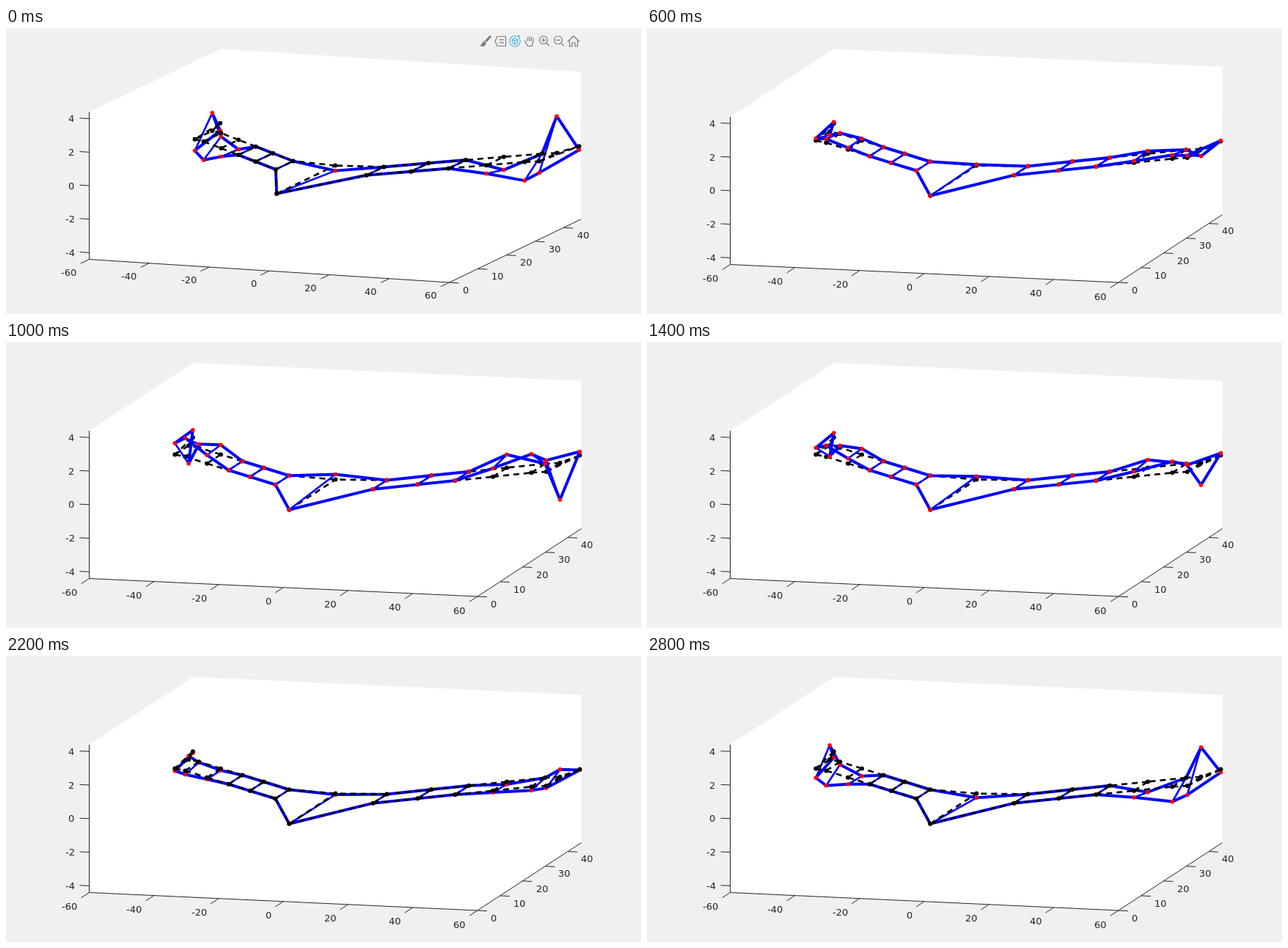
Recreate the animation shown at these times as an HTML page with a canvas. Size 866x390 px, loop 3 s.

```html
<!DOCTYPE html>
<html lang="en">
<head>
<meta charset="utf-8">
<title>Wing flapping mode</title>
<style>
html, body { margin: 0; width: 100%; height: 100%; overflow: hidden; background: #f0f0f0; }
canvas { display: block; width: 866px; height: 390px; }
</style>
</head>
<body>
<canvas id="stage" width="866" height="390"></canvas>
<script>
const ctx = document.getElementById('stage').getContext('2d');
const STEP = 200, STEPS = 15;
const BLUE = '#0000ff', RED = '#ff0000', BLACK = '#000000', INK = '#262626';

// Plot volume: x in ±X, y in 0..Y, z in ±Z
const X = 60, Y = 46, Z = 4.4, TICK = 13;

// Orthographic cameras: pixel position of the left top corner, pixels per unit of each axis
const openView = { left: 113.5, top: 114.5, ex: [4.092, 0.2625], ey: [3.9, -1.87], ez: 22.84, toolbar: true };
const sideView = { left: 113.5, top: 121, ex: [4.412, 0.2042], ey: [3.08, -2.01], ez: 22.9 };

function project({ left, top, ex, ey, ez }, x, y, z) {
  return [
    left + ex[0] * (x + X) + ey[0] * y,
    top + ex[1] * (x + X) + ey[1] * y + ez * (Z - z)
  ];
}

// Rib stations from the root outwards, and the mode's lift at each of them
const span = [0, 15.1, 25.9, 35, 44.2, 53.5, 57.4];
const frontLift = [0, 0, 0, 0, 0.5, 1.11, 0.68];
const backLift = {
  left: [0.31, 0, 0, 0, 0.57, 0.21, -1.07],
  right: [0.31, 0, 0, 0, 0.78, 0, -2.2]
};

// Swept leading edge with a clipped tip; the trailing edge runs parallel to it
function sweep(x) {
  return Math.min(34.2, 12.2 + 0.392 * x);
}

function buildWing() {
  const front = [], back = [];
  for (let i = -6; i <= 6; i++) {
    const n = Math.abs(i), x = Math.sign(i) * span[n];
    const lifts = i < 0 ? backLift.left : backLift.right;
    front.push({ x, y: n ? sweep(span[n]) : 2.6, lift: frontLift[n] });
    back.unshift({ x, y: n ? sweep(span[n]) + 6.1 : 23.1, lift: lifts[n] });
  }
  const tip = (x, lift) => ({ x, y: 45.6, lift });
  return [...front, tip(59.8, 0.22), ...back, tip(-59.8, 0.44)];
}

const wing = buildWing();

function path(points, closed) {
  ctx.beginPath();
  points.forEach(([x, y], i) => i ? ctx.lineTo(x, y) : ctx.moveTo(x, y));
  if (closed) ctx.closePath();
}

function line(...points) {
  path(points);
  ctx.stroke();
}

function circle(x, y, r) {
  ctx.beginPath();
  ctx.arc(x, y, r, 0, Math.PI * 2);
}

function label(text, x, y, alignRight) {
  const width = alignRight ? ctx.measureText(text).width : 0;
  ctx.fillText(text, Math.round(x - width), Math.round(y + 4.7));
}

// Draws a tick along a pixel direction and returns its start
function tickMark([x, y], [dx, dy]) {
  const k = TICK / Math.hypot(dx, dy);
  line([x, y], [x + dx * k, y + dy * k]);
  return [x, y, x + dx * k, y + dy * k];
}

function drawAxes(view) {
  const at = (x, y, z) => project(view, x, y, z);
  const { ex, ey } = view;
  const back = v => [-v[0], -v[1]];
  const edge = [at(-X, 0, Z), at(-X, 0, -Z), at(X, 0, -Z), at(X, Y, -Z)];

  ctx.fillStyle = '#ffffff';
  path([...edge, at(X, Y, Z), at(-X, Y, Z)], true);
  ctx.fill();

  ctx.strokeStyle = ctx.fillStyle = INK;
  ctx.lineWidth = 1;
  ctx.font = '13px "DejaVu Sans", sans-serif';
  line(...edge);

  for (let z = -4; z <= 4; z += 2) {
    const [x, y] = tickMark(at(-X, 0, z), back(ex));
    label(z, x - 20, y, true);
  }
  for (let x = -X; x <= X; x += 20) {
    const [, , endX, endY] = tickMark(at(x, 0, -Z), back(ey));
    label(x, endX - 5.3, endY + 11.7, true);
  }
  for (let y = 0; y <= 40; y += 10) {
    const [startX, startY] = tickMark(at(X, y, -Z), ex);
    label(y, startX + 18, startY + 10);
  }
}

function drawRibs(points) {
  for (let i = 0; i < 13; i++) line(points[i], points[26 - i]);
}

function drawDots(points, color, radius) {
  ctx.fillStyle = color;
  for (const [x, y] of points) {
    circle(x, y, radius);
    ctx.fill();
  }
}

function drawRest(points) {
  ctx.strokeStyle = BLACK;
  ctx.lineWidth = 2.6;
  ctx.setLineDash([8, 6]);
  points.forEach((p, i) => line(p, points[(i + 1) % points.length]));
  drawRibs(points);
  ctx.setLineDash([]);
  drawDots(points, BLACK, 3);
}

function drawBent(points) {
  ctx.strokeStyle = BLUE;
  ctx.lineWidth = 2.6;
  drawRibs(points);
  ctx.lineWidth = 4;
  path(points, true);
  ctx.stroke();
  drawDots(points, RED, 2.8);
}

function drawWing(view, amp) {
  const pose = a => wing.map(({ x, y, lift }) => project(view, x, y, a * lift));
  const layers = [() => drawBent(pose(amp)), () => drawRest(pose(0))];
  if (amp > 0) layers.reverse();
  ctx.lineJoin = 'round';
  layers.forEach(layer => layer());
}

function magnifier(x, plus) {
  circle(x - 1, 16.5, 5.5);
  ctx.stroke();
  line([x + 3, 20.5], [x + 7, 24.5]);
  line([x - 4, 16.5], [x + 2, 16.5]);
  if (plus) line([x - 1, 13.5], [x - 1, 19.5]);
}

function hand(x) {
  for (let i = 0; i < 4; i++) {
    const fx = x - 3 + i * 2.6, top = 11.5 + Math.abs(i - 1.2);
    line([fx, 18], [fx, top]);
  }
  line([x - 7, 17], [x - 2.5, 24.5], [x + 3.5, 24.5], [x + 5, 18]);
}

function cube(x, y, r) {
  const corner = i => [x + r * Math.sin(i * Math.PI / 3), y - r * Math.cos(i * Math.PI / 3)];
  path([0, 1, 2, 3, 4, 5].map(corner), true);
  ctx.stroke();
  for (const i of [1, 3, 5]) line([x, y], corner(i));
}

function drawToolbar() {
  ctx.strokeStyle = ctx.fillStyle = '#7c7c7c';

  // brush
  ctx.lineWidth = 3;
  line([661, 11], [654, 18.5]);
  ctx.lineWidth = 1.2;
  path([[651.5, 17.5], [655, 21], [652, 25], [646.5, 25]], true);
  ctx.fill();

  // data tip
  path([[670, 11.5], [681.5, 11.5], [681.5, 24.5], [670, 24.5], [667, 18]], true);
  ctx.stroke();
  line([672.5, 16], [679, 16]);
  line([672.5, 20], [679, 20]);

  hand(714);
  magnifier(734, true);
  magnifier(754, false);

  // home
  line([766, 18.5], [774, 11], [782, 18.5]);
  line([768.5, 17], [768.5, 25], [772, 25], [772, 20], [776, 20], [776, 25], [779.5, 25], [779.5, 17]);

  // rotate
  ctx.strokeStyle = ctx.fillStyle = '#4db5ee';
  ctx.beginPath();
  ctx.arc(694, 18, 7.2, -0.55, Math.PI * 2 - 1.15);
  ctx.stroke();
  path([[697, 10], [701, 10.5], [700, 14.5]], true);
  ctx.fill();
  cube(694, 18, 4.2);
}

// Fast rise from -1 to 1, then a fall at half that pace
function amplitude(step) {
  return (step <= 5 ? 2 * step - 5 : 10 - step) / 5;
}

function draw(step) {
  const view = step === 0 ? openView : sideView;
  ctx.fillStyle = '#f0f0f0';
  ctx.fillRect(0, 0, 866, 390);
  drawAxes(view);
  drawWing(view, amplitude(step));
  if (view.toolbar) drawToolbar();
}

const start = performance.now();
function tick() {
  const time = Math.max(0, performance.now() - start);
  draw(Math.floor(time / STEP) % STEPS);
  requestAnimationFrame(tick);
}
tick();
</script>
</body>
</html>
```
